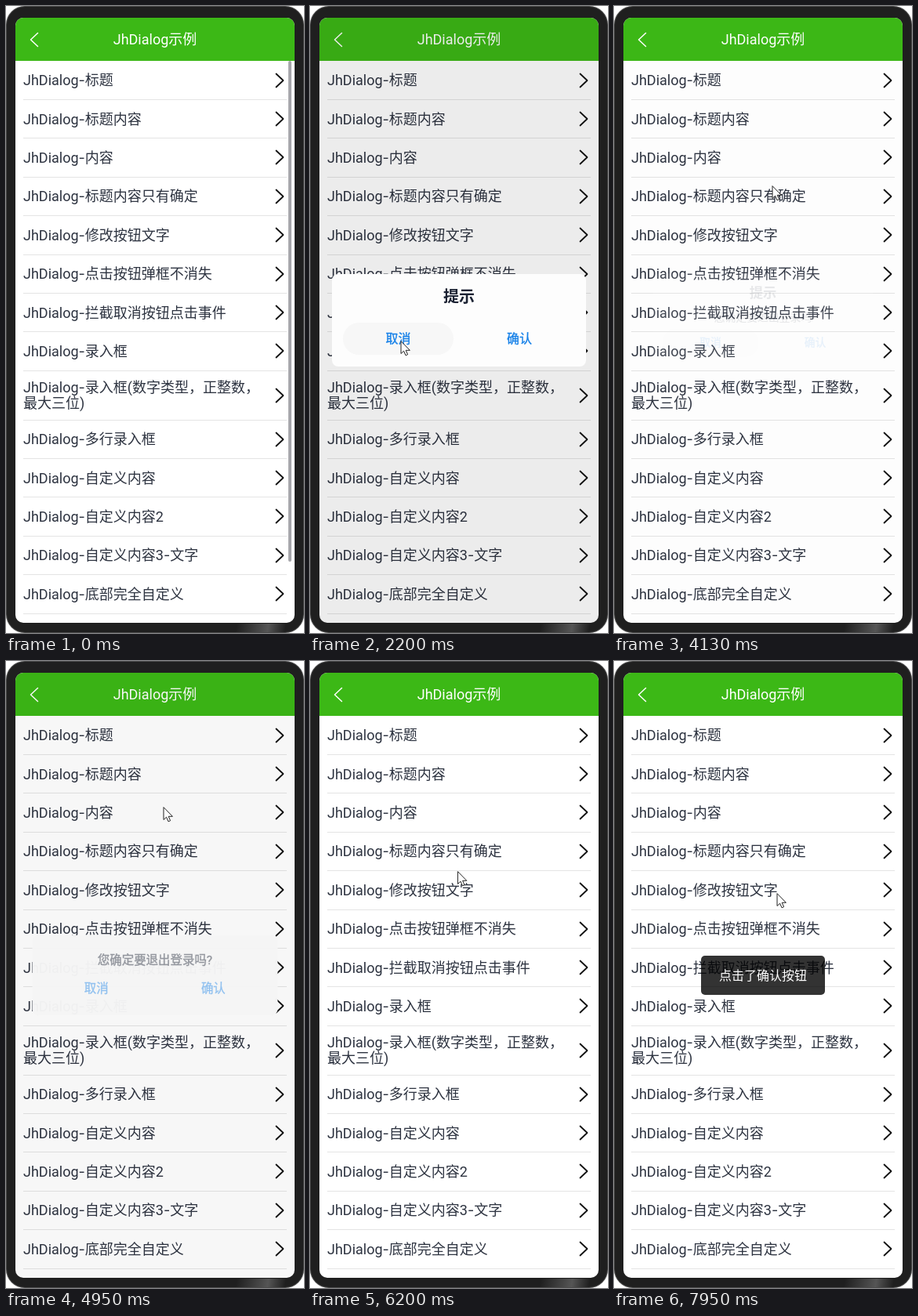
Recreate the animation shown at these times as an HTML page. Size 380 px wide and 800 px high, loop 8000 ms.

```html
<!DOCTYPE html>
<html lang="zh-CN">
<head>
<meta charset="utf-8">
<style>
  html, body { margin: 0; width: 100%; height: 100%; overflow: hidden; background: #fff; }
  body { font: 18px/20px Roboto, "Noto Sans CJK SC", "Noto Sans CJK", sans-serif; color: #2d3340; }
  div, svg { position: absolute; box-sizing: border-box; }
  #phone {
    left: 0; top: 0; width: 380px; height: 800px; border-radius: 24px; overflow: hidden;
    background:
      linear-gradient(100deg, transparent 290px, #555 330px, transparent 352px) 0 788px / 380px 12px no-repeat,
      #1f1f1f;
    box-shadow: inset 0 0 0 1px #4a4a4a;
  }
  #screen { left: 12px; top: 15px; width: 356px; height: 772px; border-radius: 10px; overflow: hidden; background: #fff; }
  #view { left: -12px; top: -15px; width: 380px; height: 800px; }
  #head { left: 0; top: 0; width: 380px; height: 70px; background: #3cb816; }
  .row { left: 22px; width: 336px; border-bottom: 1px solid #e4e4e4; display: flex; align-items: center; }
  .row span { width: 305px; padding-top: 1px; }
  i { font: 18px/0 Inter, sans-serif; }
  #bar { left: 360px; top: 70px; width: 4px; height: 639px; border-radius: 2px; background: #a6a6ab; }
  #mask { left: 0; top: 0; width: 380px; height: 800px; background: #000; }
  .dialog { left: 28px; width: 324px; }
  .panel, .content { inset: 0; border-radius: 8px; }
  .text { transform: translate(-50%, -50%); white-space: nowrap; font-size: 16px; padding-top: 1px; }
  .title { font-size: 20px; font-weight: bold; color: #1b2233; }
  .body { color: #1b2233; -webkit-text-stroke: .15px; }
  .strong { color: #1b2233; -webkit-text-stroke: .4px; }
  .button { color: #1681e8; -webkit-text-stroke: .35px; }
  .pill { height: 41px; border-radius: 21px; background: #f7f7f7; }
  #toast { left: 111px; top: 376px; width: 158px; height: 50px; border-radius: 5px; background: rgba(0, 0, 0, .8); color: #fff; }
  path { fill: none; stroke-linecap: round; stroke-linejoin: round; }
</style>
</head>
<body>
<div id="phone"><div id="screen"><div id="view">
  <div id="head">
    <svg width="380" height="70"><path d="M40.5 34.5 31.5 43l9 8.5" stroke="#fff" stroke-width="1.5"/></svg>
    <div class="text" style="left:190px;top:42px;font-size:18px;color:#fff">JhDialog示例</div>
  </div>
  <div id="list"></div>
  <div id="bar"></div>
  <div id="mask"></div>
  <div id="dialogs"></div>
  <div id="toast"><div class="text" style="left:79px;top:25px">点击了确认按钮</div></div>
  <svg id="cursor" width="14" height="22" style="left:0;top:0">
    <path d="M1 1V16.5L4.6 13.2 7 18.8 9.6 17.7 7.2 12.3H12Z" style="fill:#fff" stroke="#222"/>
  </svg>
</div></div></div>
<script>
const LOOP = 8000;
const $ = id => document.getElementById(id);
const clamp = v => Math.min(1, Math.max(0, v));

const rows = ['标题', '标题内容', '内容', '标题内容只有确定', '修改按钮文字', '点击按钮弹框不消失',
  '拦截取消按钮点击事件', '录入框', '录入框(数字类型，正整数，最大三位)', '多行录入框',
  '自定义内容', '自定义内容2', '自定义内容3-文字', '底部完全自定义'];
let y = 70.6;
$('list').innerHTML = rows.map((label, n) => {
  const h = n === 8 ? 62.8 : 49.4, top = y;
  y += h;
  return `<div class="row" style="top:${top}px;height:${h}px">
    <span>${('JhDialog-' + label).replaceAll('-', '<i>-</i>')}</span>
    <svg width="14" height="20" style="left:320px;top:${h / 2 - 10.6}px">
      <path d="M2.5 1.5 11.5 10l-9 8.5" stroke="#111" stroke-width="1.8"/></svg></div>`;
}).join('');

// Texts, box height, then the times of opening, pressing and closing
const dialogs = [
  { title: '提示', h: 118, open: 1220, press: 2190, close: 2300 },
  { title: '提示', body: '您确定要退出登录吗', h: 138, open: 2970, press: 3850, close: 3950 },
  { body: '您确定要退出登录吗?', h: 106, open: 4900, press: 5640, close: 5760 },
  { title: '警告', body: '您的账号在异地登录，请重新登录！', h: 138, open: 6580, press: 7430, close: 7530, single: true },
];
const text = (cls, x, top, s) => `<div class="text ${cls}" style="left:${x}px;top:${top}px">${s}</div>`;
for (const d of dialogs) {
  const by = d.h - 36;
  d.el = document.createElement('div');
  d.el.className = 'dialog';
  d.el.style.cssText = `top:${401 - d.h / 2}px;height:${d.h}px`;
  d.el.innerHTML = '<div class="panel"></div><div class="content">' +
    `<div class="pill" style="left:14px;top:${by - 20}px;width:${d.single ? 296 : 141}px"></div>` +
    (d.title ? text('title', 162, 27.5, d.title) : '') +
    (d.body ? text(d.title ? 'body' : 'strong', 162, d.title ? 64.5 : 32.5, d.body) : '') +
    (d.single ? text('button', 162, by, '好的')
      : text('button', 84.5, by, '取消') + text('button', 239, by, '确认')) + '</div>';
  [d.panel, d.content] = d.el.children;
  d.pill = d.content.firstChild;
  $('dialogs').append(d.el);
}

// Pointer stops: time, x, y
const stops = [
  [200, 42, 250], [720, 178, 88], [1300, 178, 88], [1950, 115, 427], [2270, 115, 427],
  [2680, 192, 138], [2970, 192, 138], [3050, 193, 172], [3640, 115, 430], [3880, 115, 430],
  [4130, 201, 229], [4370, 200, 186], [4950, 200, 186], [5600, 111, 425], [5780, 111, 425],
  [6350, 203, 236], [6580, 203, 236], [6820, 140, 430], [7240, 184, 430], [7480, 184, 430],
  [7940, 207, 296], [LOOP, 207, 296],
];
function pointer(t) {
  const k = Math.max(1, stops.findIndex(s => s[0] > t));
  const [t0, x0, y0] = stops[k - 1], [t1, x1, y1] = stops[k];
  const u = clamp((t - t0) / (t1 - t0)), e = u * u * (3 - 2 * u);
  return [x0 + (x1 - x0) * e, y0 + (y1 - y0) * e];
}

function draw(t) {
  let dim = 0;
  for (const d of dialogs) {
    const up = clamp((t - d.open) / 200), down = clamp((t - d.close) / 200);
    const shown = 1 - (1 - up) ** 2, grey = 238 + 15 * shown;
    // The panel covers the list at once while its content fades in
    d.panel.style.opacity = 1 - (1 - up) ** 12;
    d.panel.style.background = `rgb(${grey}, ${grey}, ${grey})`;
    d.content.style.opacity = shown;
    d.el.style.opacity = 1 - down;
    d.el.style.transform = `scale(${1 - .15 * (1 - up) ** 5 - .15 * down})`;
    d.pill.style.opacity = t >= d.press ? 1 : 0;
    dim = Math.max(dim, shown * (1 - down));
  }
  $('mask').style.opacity = .073 * dim;
  $('bar').style.opacity = 1 - clamp((t - 180) / 420);
  $('toast').style.opacity = clamp((t - 7560) / 150);
  const [px, py] = pointer(t);
  $('cursor').style.transform = `translate(${px}px, ${py}px)`;
  $('cursor').style.opacity = t < 200 ? 0 : 1;
}

const start = performance.now();
function frame() {
  draw((performance.now() - start) % LOOP);
  requestAnimationFrame(frame);
}
frame();
</script>
</body>
</html>
```
